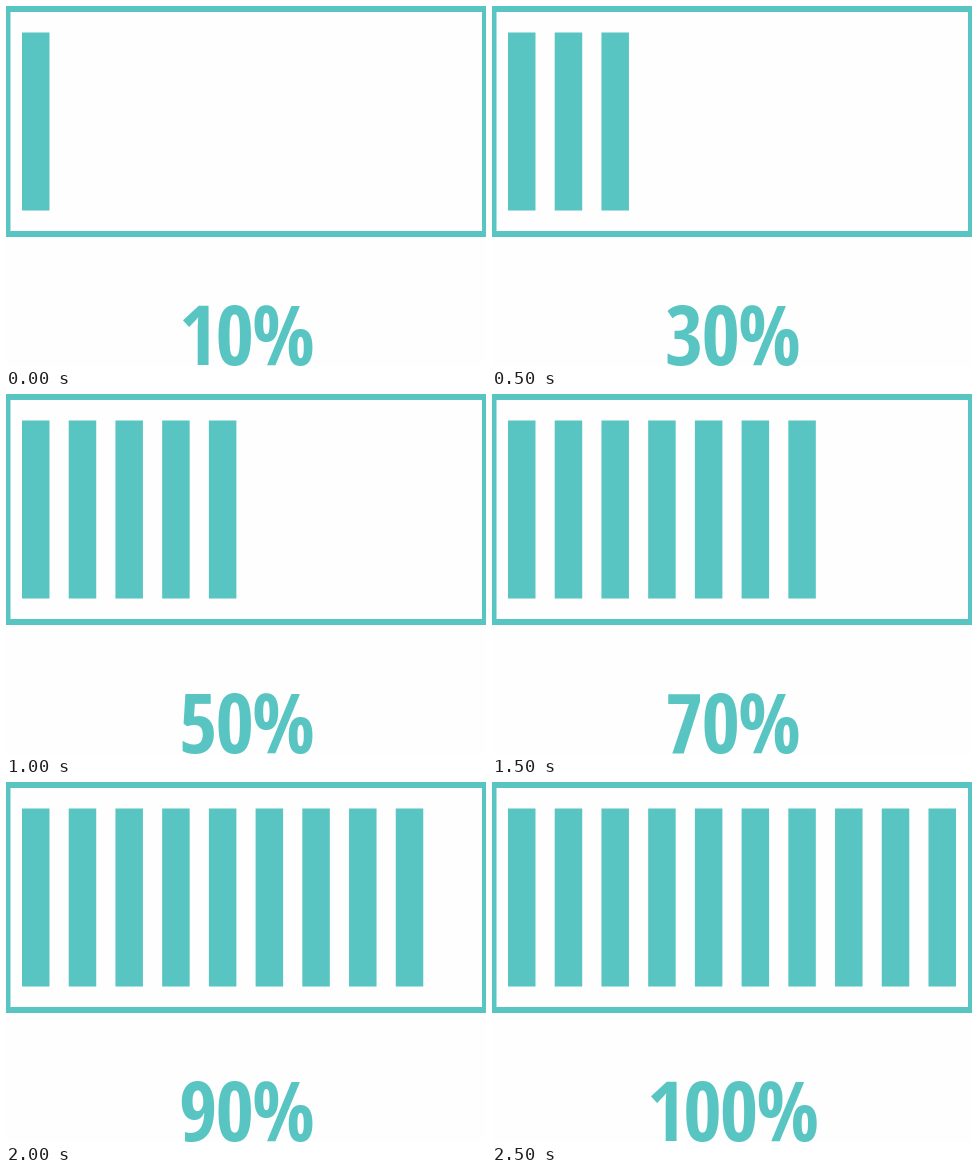
Write an HTML page with a canvas that moves like this. It is 480 px wide and 360 px high and loops after 3 s.

```html
<!DOCTYPE html>
<html lang="en">
<head>
<meta charset="utf-8">
<title>Progress bar</title>
<style>
  html, body { margin: 0; width: 100%; height: 100%; overflow: hidden; background: #fdfefd; }
  canvas { display: block; }
</style>
</head>
<body>
<canvas id="stage" width="480" height="360"></canvas>
<script>
const ctx = document.getElementById("stage").getContext("2d");
const TEAL = "#58c5c2";
const PAPER = "#fdfefd";
const STEP_MS = 500;
const LEVELS = [1, 3, 5, 7, 9, 10];

function rect(color, x, y, w, h) {
  ctx.fillStyle = color;
  ctx.fillRect(x, y, w, h);
}

function draw(time) {
  const level = LEVELS[Math.floor(time / STEP_MS) % LEVELS.length];
  rect(PAPER, 0, 0, 480, 360);
  rect(TEAL, 0, 0, 480, 231);
  rect(PAPER, 4.5, 6, 471.5, 219);
  for (let i = 0; i < level; i++) {
    rect(TEAL, 16 + i * 46.72, 26.5, 27.5, 178);
  }

  ctx.font = "bold condensed 83px 'Open Sans Condensed', 'Open Sans', sans-serif";
  ctx.letterSpacing = "-2px";
  ctx.textAlign = "center";
  ctx.fillStyle = TEAL;
  ctx.fillText(level * 10 + "%", 240, 359);
}

const start = performance.now();
function tick() {
  draw(performance.now() - start);
  requestAnimationFrame(tick);
}
tick();
</script>
</body>
</html>
```
